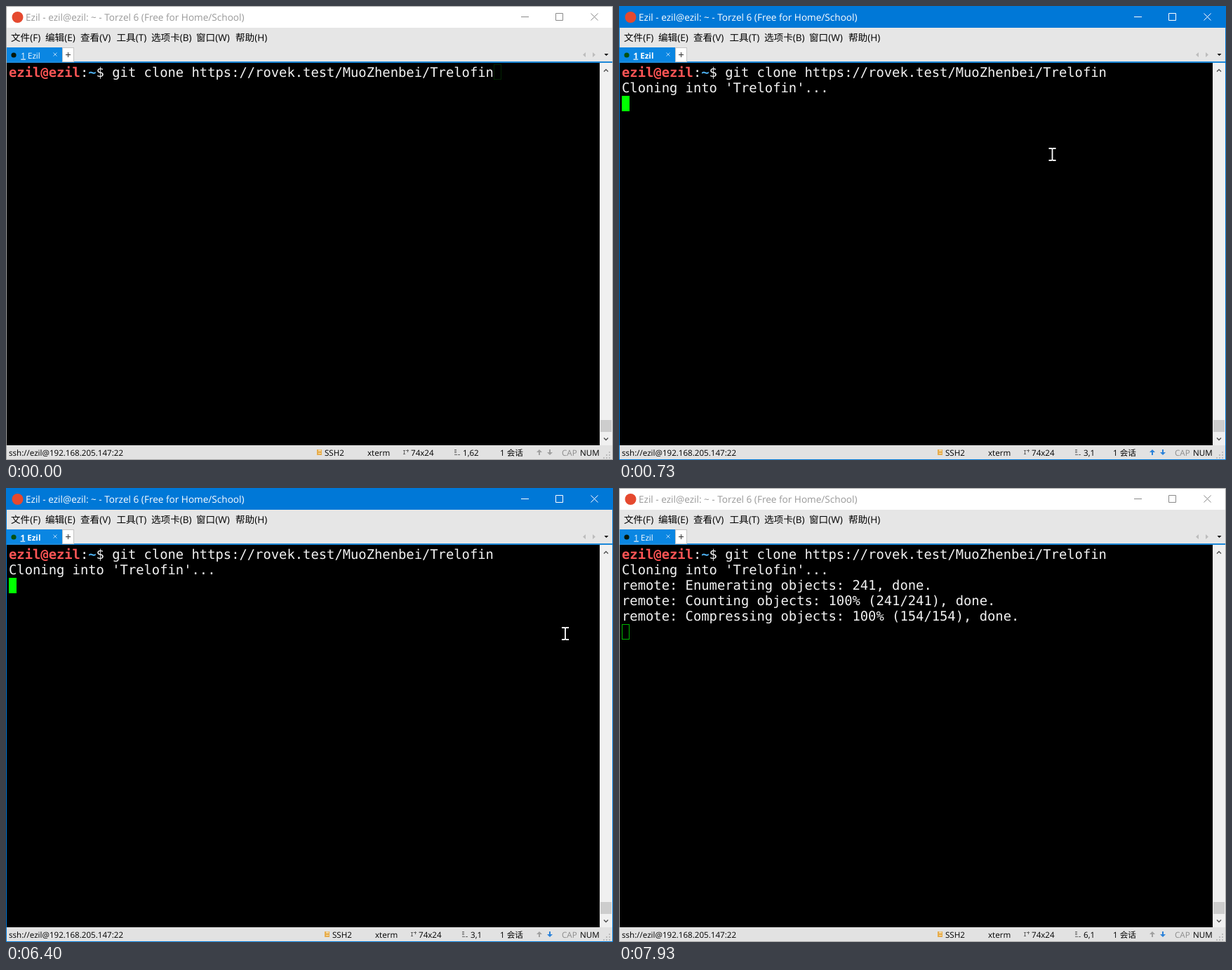
Animation of 865 by 647 pixels, one loop 8 s. Source, as an HTML page:

```html
<!DOCTYPE html>
<html lang="zh">
<head>
<meta charset="utf-8">
<title>Terminal</title>
<style>
  html, body { margin: 0; width: 865px; height: 647px; overflow: hidden; background: #000; }
  svg { display: block; }
  text { font: 11.6px "Open Sans", "Noto Sans CJK SC", "Noto Sans CJK", sans-serif; fill: #000;
         white-space: pre; text-rendering: geometricPrecision; }
  .menu text { font-size: 13.6px; }
  .term text { font: 18.82px "DejaVu Sans Mono", monospace; fill: #f2f2f2; }
  .user { fill: #ff5555; font-weight: bold; }
  .path { fill: #4fb4f5; font-weight: bold; }
  .title { fill: #fff; }
  .titleText { font-size: 13.6px; fill: #999; }
  .controls { fill: none; stroke: #8a8a8a; }
  .frame { fill: none; stroke: #a4a4a4; }
  .tabText { fill: #fff; text-anchor: middle; }
  .dot { fill: #06180a; }
  .arrow { fill: #a0a0a0; }
  .arrow.lit { fill: #2b82d9; }
  .on .title { fill: #0078d7; }
  .on .titleText { fill: #fff; }
  .on .controls { stroke: #fff; }
  .on .frame { stroke: #0078d7; }
  .on .tabText { font-weight: bold; }
  .on .dot { fill: #05500f; }
</style>
</head>
<body>
<svg id="win" width="865" height="647" viewBox="0 0 865 647">
  <rect width="865" height="647" fill="#e6e6e6"/>

  <rect class="title" width="865" height="31"/>
  <circle cx="16.5" cy="16" r="8" fill="#e5492f"/>
  <text class="titleText" x="28" y="20.5">Ezil - ezil@ezil: ~ - Torzel 6 (Free for Home/School)</text>
  <path class="controls" d="M734 15.5h11M783.5 10.5h10v10h-10zM833.5 10.5l10 10m0-10l-10 10"/>

  <g class="menu">
    <text x="7" y="49.5">文件(F)</text>
    <text x="56" y="49.5">编辑(E)</text>
    <text x="106" y="49.5">查看(V)</text>
    <text x="157.5" y="49.5">工具(T)</text>
    <text x="207" y="49.5">选项卡(B)</text>
    <text x="271" y="49.5">窗口(W)</text>
    <text x="327" y="49.5">帮助(H)</text>
  </g>

  <rect x="1" y="59" width="79" height="21" fill="#0a86e2"/>
  <rect x="1" y="79" width="863" height="2" fill="#1c88d8"/>
  <circle class="dot" cx="11" cy="70" r="3.6"/>
  <text class="tabText" x="35" y="74.5"><tspan text-decoration="underline">1</tspan> Ezil</text>
  <path d="M67.500 66.500l5 5m0-5l-5 5" stroke="#a9d6f7"/>
  <rect x="80.500" y="59.500" width="16" height="20" fill="#fff" stroke="#c4c4c4"/>
  <path d="M85 69.500h7M88.500 66v7" stroke="#333"/>
  <path d="M826 66v7l-4-3.500zM836 66v7l4-3.500z" fill="#bdbdbd"/>
  <path d="M852.500 68h6l-3 3z"/>

  <rect x="1" y="81" width="845" height="545"/>
  <g class="term">
    <rect id="caret" width="11"/>
    <text x="4" y="101"><tspan class="user">ezil@ezil</tspan>:<tspan class="path">~</tspan>$ git clone https://rovek.test/MuoZhenbei/Trelofin</text>
    <text x="4" y="123">Cloning into 'Trelofin'...</text>
    <text x="4" y="145">remote: Enumerating objects: 241, done.</text>
    <text x="4" y="167">remote: Counting objects: 100% (241/241), done.</text>
    <text x="4" y="189">remote: Compressing objects: 100% (154/154), done.</text>
  </g>

  <rect x="846" y="81" width="18" height="545" fill="#f0f0f0"/>
  <rect x="847" y="590" width="16" height="17" fill="#cdcdcd"/>
  <path d="M852 93.500l3-3 3 3M852 615.500l3 3 3-3" fill="none" stroke="#505050" stroke-width="1.400"/>

  <rect y="626" width="865" height="21" fill="#e2e2e2"/>
  <text x="4" y="640.500">ssh://ezil@192.168.205.147:22</text>
  <g id="session">
    <path d="M443 632h7v8h-7z" fill="#e6ac4c"/>
    <path d="M445 632.500h4v2h-4zM445 637h4v1h-4z" fill="#f7dfad"/>
    <text x="454" y="640.500">SSH2</text>
    <text x="515" y="640.500">xterm</text>
    <path d="M567.500 633v6M566 633.500h3M570 633.500h4M572.500 632v4M566 638.500h3" fill="none" stroke="#666"/>
    <text x="577" y="640.500">74x24</text>
    <path d="M639 632.500h3M639 634.500h3M639 636.500h3M639 639.500h4M644 639.500h3" stroke="#666"/>
    <text id="pos" x="651" y="640.500"></text>
  </g>
  <text x="704" y="640.500">1 会话</text>
  <path id="up" class="arrow" d="M759 640v-4h-3l4-4 4 4h-3v4z"/>
  <path id="down" class="arrow" d="M774 632v4h-3l4 4 4-4h-3v-4z"/>
  <text x="792" y="640.500" style="fill:#8c8c8c">CAP</text>
  <text x="818" y="640.500">NUM</text>
  <path d="M859 635h2v2h-2zM859 639h2v2h-2zM855 639h2v2h-2zM859 643h2v2h-2zM855 643h2v2h-2zM851 643h2v2h-2z" fill="#bcbcbc"/>

  <g id="mouse" fill="none" stroke="#fff" stroke-width="1.800">
    <path d="M-5-8.500h3.500q1.500 0 1.500 1.500v14q0 1.500-1.500 1.500h-3.500M5-8.500h-3.500q-1.500 0-1.500 1.500v14q0 1.500 1.500 1.500h3.500"/>
  </g>
  <rect class="frame" x=".5" y=".5" width="864" height="646"/>
</svg>
<script>
const LOOP = 8000, CELL = 11.33;
const $ = id => document.getElementById(id);
const lines = document.querySelectorAll('.term text');

// Each step overrides only what changes at that time.
const steps = [
  { at: 0, active: false, mouse: null, rows: 1, up: false, down: false },
  { at: 200, mouse: [617.5, 211.5] },
  { at: 400, active: true },
  { at: 730, rows: 2, up: true, down: true },
  { at: 1130, mouse: [681.5, 209.5], up: false },
  { at: 1270, mouse: [704, 209.5] },
  { at: 3730, mouse: [712, 207.5] },
  { at: 6400, mouse: [797, 207.5] },
  { at: 6730, rows: 3, mouse: [799, 207.5] },
  { at: 7270, rows: 4, mouse: [806, 207.5] },
  { at: 7400, rows: 5, mouse: null },
  { at: 7930, active: false }
];

function set(el, attrs) {
  for (const name in attrs) el.setAttribute(name, attrs[name]);
}

function drawCaret(row, col, active) {
  const inset = active ? 0 : 0.5;
  set($('caret'), {
    x: Math.round(4 + col * CELL) + inset,
    y: Math.round(83.4 + row * 22.2) + inset,
    width: 11 - inset * 2,
    height: 22 - inset * 2,
    fill: active ? '#00ff00' : 'none',
    stroke: active ? 'none' : row ? '#00b400' : '#022402'
  });
}

function draw(t) {
  const s = Object.assign({}, ...steps.filter(step => step.at <= t));
  const typing = s.rows === 1;
  const row = typing ? 0 : s.rows, col = typing ? 61 : 0;

  $('win').classList.toggle('on', s.active);
  $('up').classList.toggle('lit', s.up);
  $('down').classList.toggle('lit', s.down);
  lines.forEach((line, i) => line.style.display = i < s.rows ? '' : 'none');
  drawCaret(row, col, s.active);
  $('pos').textContent = `${row + 1},${col + 1}`;
  set($('session'), { transform: `translate(${typing ? 0 : 11} 0)` });
  $('mouse').style.display = s.mouse ? '' : 'none';
  if (s.mouse) set($('mouse'), { transform: `translate(${s.mouse})` });
}

const start = performance.now();
function tick() {
  draw((performance.now() - start) % LOOP);
  requestAnimationFrame(tick);
}
tick();
</script>
</body>
</html>
```
